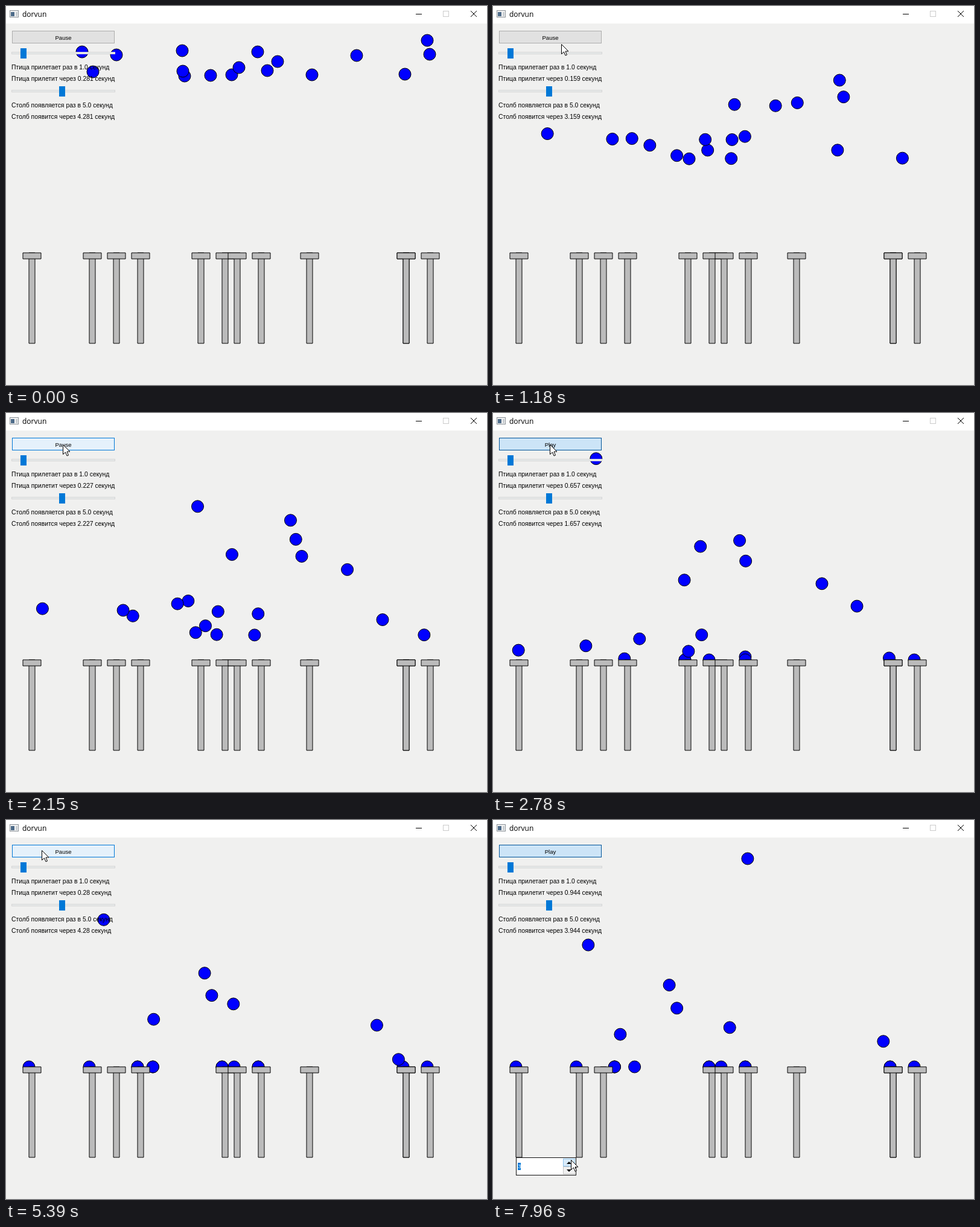
An HTML page with a canvas that plays this animation: 797 px wide and 628 px high, repeating every 8000 ms.

```html
<!DOCTYPE html>
<html lang="ru">
<head>
<meta charset="utf-8">
<title>Birds and poles</title>
<style>
html, body { margin: 0; height: 100%; overflow: hidden; background: #f0f0ef; }
canvas { display: block; }
</style>
</head>
<body>
<canvas id="stage" width="797" height="628"></canvas>
<script>
const ctx = document.getElementById('stage').getContext('2d');
const LOOP = 8000, TICK = 69.4, RESUME = 4633;   // real ms
const PAUSE_1 = 2624, PAUSE_2 = 3680;            // simulation ms
const SPEED = 0.125, SEAT_Y = 409, CAPACITY = 3;

// Pole seat: where the birds heading for it start
const flock = {
  38: [[126, 76], [698, 57]],
  138: [[339, 115], [581, 82], [702, 80]],
  178: [],
  218: [[183, 81], [433, 107]],
  318: [[293, 108], [386, 102], [450, 92]],
  358: [[296, 116]],
  378: [[144, 109]],
  418: [[417, 76], [374, 114]],
  498: [],
  658: [[507, 114]],
  698: [[292, 74], [661, 113]]
};
// Newcomers, one per second of running time: x, y, seat
const newcomers = [[449, 71, 658], [282, 65, 418], [175, 33, 138], [422, 57, 418]];

// Pointer moves: start, end, x, y
const moves = [
  [70, 690, 189, 108], [760, 1350, 94, 52], [3400, 3850, 36, 76],
  [3850, 4300, 59, 50], [5760, 6500, 29, 487], [7000, 7900, 129, 563]
];

const clamp = (v, lo, hi) => Math.min(hi, Math.max(lo, v));
const mix = (a, b, k) => a + (b - a) * k;
const mixColor = (a, b, k) => `rgb(${a.map((v, i) => Math.round(mix(v, b[i], k)))})`;

// A bird is a list of straight flights
const seats = Object.keys(flock).map(Number);
const flight = (at, x, y, seat) => ({ at, x, y, seat, time: Math.hypot(seat - x, SEAT_Y - y) / SPEED });
const landing = bird => bird.at(-1).at + bird.at(-1).time;
const birth = k => k < 3 ? 281 + 1000 * k : PAUSE_1 + 1000 * (k - 2);
const birds = [
  ...seats.toReversed().flatMap(seat => flock[seat].map(([x, y]) => [flight(0, x, y, seat)])),
  ...newcomers.map(([x, y, seat], k) => [flight(birth(k), x, y, seat)])
];

// A pole breaks under its third bird; the three scatter to poles nearby
const fallen = {};
function breakPoles() {
  const standing = seats.filter(seat => !(seat in fallen));
  const full = standing
    .map(seat => ({ seat, guests: birds.filter(b => b.at(-1).seat === seat).sort((a, b) => landing(a) - landing(b)) }))
    .filter(p => p.guests.length >= CAPACITY)
    .map(p => ({ ...p, time: landing(p.guests[CAPACITY - 1]) }))
    .sort((a, b) => a.time - b.time)[0];
  if (!full || full.time > PAUSE_2) return;
  const { seat, guests, time } = full, i = standing.indexOf(seat);
  fallen[seat] = time;
  [i - 1, i + 1, i - 2].forEach((to, k) => guests[k].push(flight(time, seat, SEAT_Y, standing[to])));
  breakPoles();
}
breakPoles();

function box(x, y, w, h, fill, stroke) {
  ctx.fillStyle = fill;
  ctx.fillRect(x, y, w, h);
  if (stroke) {
    ctx.strokeStyle = stroke;
    ctx.strokeRect(x, y, w, h);
  }
}

function shape(points, fill, stroke) {
  ctx.beginPath();
  points.forEach(p => ctx.lineTo(...p));
  ctx.closePath();
  ctx.fillStyle = fill;
  ctx.fill();
  if (stroke) {
    ctx.strokeStyle = stroke;
    ctx.stroke();
  }
}

function line(x1, y1, x2, y2) {
  ctx.strokeStyle = '#000';
  ctx.beginPath();
  ctx.moveTo(x1, y1);
  ctx.lineTo(x2, y2);
  ctx.stroke();
}

function text(str, x, y, size, family = '"Liberation Sans", Arial', color = '#000') {
  ctx.font = `${size}px ${family}, sans-serif`;
  ctx.fillStyle = color;
  ctx.fillText(str, x, y);
}

// Simulation clock: runs, pauses, resumes, pauses again
const simTime = t => t < RESUME
  ? clamp(t * 0.959 - 9.5, 0, PAUSE_1)
  : clamp(PAUSE_1 + (t - RESUME) * 0.948, PAUSE_1, PAUSE_2);

function drawBird(bird, s) {
  const leg = bird.findLast(f => f.at <= s);
  if (!leg) return;
  const k = Math.min(1, (s - leg.at) / leg.time);
  ctx.beginPath();
  ctx.arc(mix(leg.x, leg.seat, k), mix(leg.y, SEAT_Y, k), 10, 0, Math.PI * 2);
  ctx.fillStyle = '#00f';
  ctx.fill();
  ctx.strokeStyle = '#000';
  ctx.stroke();
}

function drawScene(s) {
  birds.forEach(bird => drawBird(bird, s));
  ctx.lineJoin = 'bevel';
  for (const seat of [...seats, 658]) {   // two poles share one spot
    if (s >= fallen[seat]) continue;
    box(seat, SEAT_Y, 10, 150, '#bbb', '#000');
    box(seat - 10, SEAT_Y, 30, 10, '#bbb', '#000');
  }
  ctx.lineJoin = 'miter';
}

function drawTitleBar() {
  box(0, 0, 797, 29, '#fff');
  box(6.5, 7.5, 14, 11, '#f4f4f4', '#8a9096');
  box(8, 10, 6, 7, '#4c6a88');
  box(16, 10, 3, 7, '#c9ced2');
  text('dorvun', 27, 18, 12, '"Open Sans", "Noto Sans"');
  line(679, 13.5, 689, 13.5);
  ctx.strokeStyle = '#ccc';
  ctx.strokeRect(724.5, 8.5, 9, 9);
  line(770, 8, 780, 18);
  line(780, 8, 770, 18);
}

function drawButton(t, paused) {
  const plain = { fill: [225, 225, 225], edge: [173, 173, 173] };
  const hover = { fill: [229, 241, 251], edge: [0, 120, 215] };
  const down = { fill: [204, 228, 247], edge: [0, 84, 153] };
  const late = t >= RESUME, from = paused || late ? down : plain;
  const k = paused ? 0 : clamp(late ? (t - RESUME) / 270 : (t - 1300) / 200, 0, 1);
  box(10.5, 41.5, 169, 20, mixColor(from.fill, hover.fill, k), mixColor(from.edge, hover.edge, k));
  ctx.textAlign = 'center';
  text(paused ? 'Play' : 'Pause', 95, 56, 9.6);
  ctx.textAlign = 'left';
}

function drawSlider(y, knob) {
  box(9.5, y + 6.5, 171, 3, '#e7eaea', '#d6d6d6');
  box(knob, y, 10, 17, '#0078d7');
}

function drawPanel(t, s) {
  const resumed = t >= RESUME;
  const elapsed = Math.round(s + (resumed ? -PAUSE_1 : 719));
  const left = period => (period - elapsed % period) / 1000;
  drawButton(t, s >= (resumed ? PAUSE_2 : PAUSE_1));
  drawSlider(70, 24);
  drawSlider(133, 88);
  text('Птица прилетает раз в 1.0 секунд', 9, 105, 10.4);
  text(`Птица прилетит через ${left(1000)} секунд`, 9, 124, 10.4);
  text('Столб появляется раз в 5.0 секунд', 9, 168, 10.4);
  text(`Столб появится через ${left(5000)} секунд`, 9, 187, 10.4);
}

function drawSpinBox(t) {
  const over = t > 7850;
  box(38.5, 559.5, 99, 29, '#fff', '#111');
  box(41, 568, 5, 12, '#0078d7');
  text('3', 41.2, 577, 9, '"Liberation Sans", Arial', '#fff');
  box(116.5, 561.5, 19, 12, over ? '#d9ebf9' : '#f0f0f0', over ? '#8ec3ec' : '#c4c4c4');
  box(116.5, 574.5, 19, 12, '#f0f0f0', '#c4c4c4');
  shape([[122, 570], [126, 566], [130, 570]], '#000');
  shape([[122, 579], [126, 583], [130, 579]], '#000');
}

function drawPointer(t) {
  if (t < moves[0][0] - 1) return;
  let x = 1, y = 590;
  for (const [start, end, toX, toY] of moves) {
    const u = clamp((t - start) / (end - start), 0, 1), k = u * u * (3 - 2 * u);
    x = mix(x, toX, k);
    y = mix(y, toY, k);
  }
  const outline = [[0, 0], [0, 16], [4, 12.5], [6.5, 18.5], [9, 17.5], [6.5, 11.5], [11.5, 11.5]];
  shape(outline.map(([dx, dy]) => [Math.round(x) + dx + 0.5, Math.round(y) + dy + 0.5]), '#fff', '#000');
}

function draw(now) {
  const clock = now % LOOP, base = clock < 4560 ? 0 : 4560;
  const t = base + Math.floor((clock - base + 6) / TICK) * TICK;
  const s = simTime(t);
  ctx.lineWidth = 1;
  box(0, 0, 797, 628, '#f0f0ef');
  drawScene(s);
  drawTitleBar();
  drawPanel(t, s);
  if (t >= 6850) drawSpinBox(t);
  drawPointer(t);
}

let start;
function loop(now) {
  start ??= now;
  draw(Math.max(0, now - start));
  requestAnimationFrame(loop);
}
requestAnimationFrame(loop);
</script>
</body>
</html>
```
